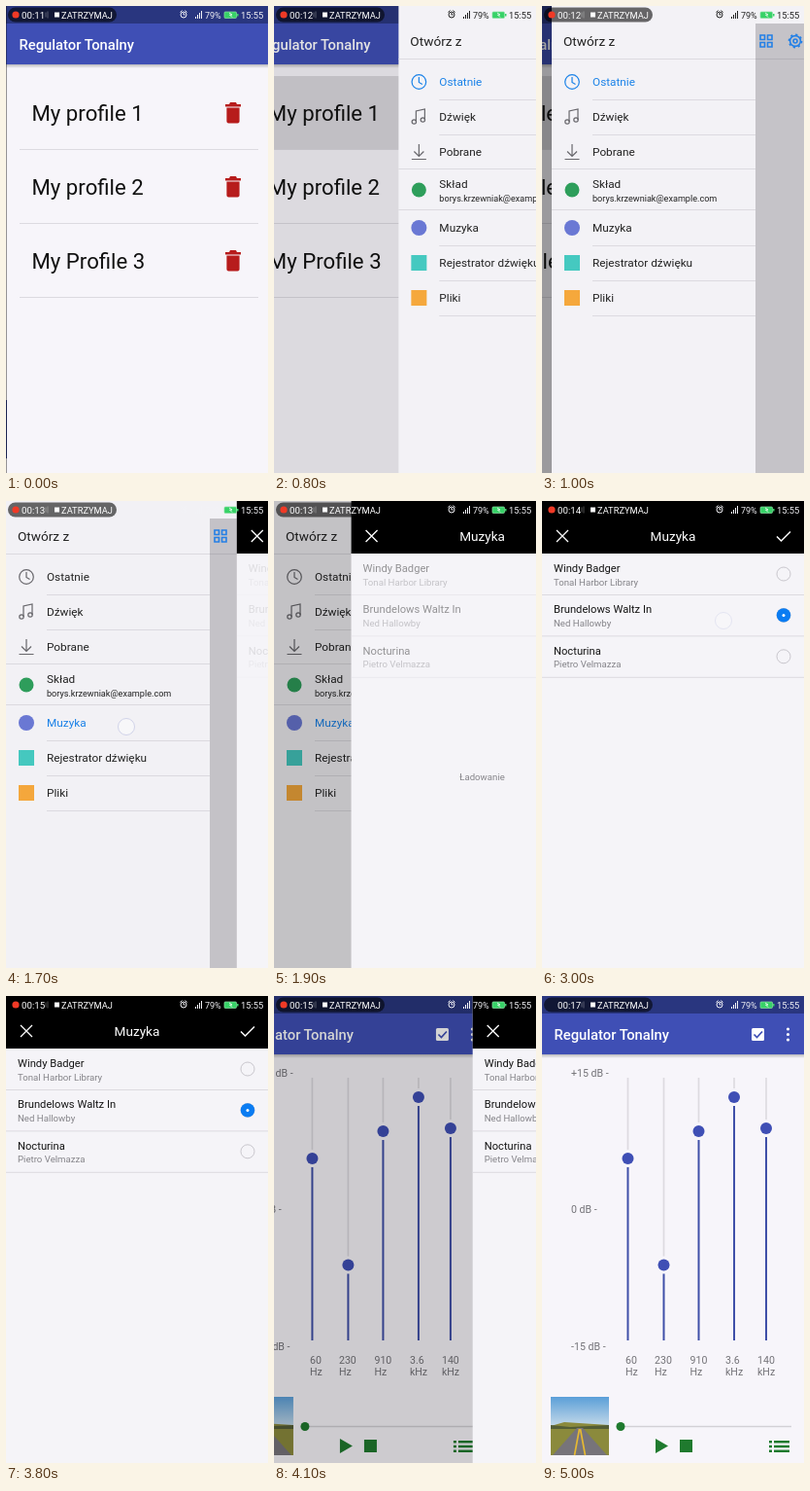
An HTML page for the animation above (5.1 s loop, 270x480 px).

```html
<!DOCTYPE html>
<html lang="pl">
<head>
<meta charset="utf-8">
<title>Regulator</title>
<style>
html, body { margin: 0; width: 100%; height: 100%; overflow: hidden; background: #f7f5fa; }
svg { display: block; width: 270px; height: 480px; font-family: Roboto, "Noto Sans", sans-serif; }
.bar { font-size: 14.8px; font-weight: 500; fill: #fff; }
.head { font-size: 13.6px; }
.name { font-size: 22.2px; fill: #111; }
.item { font-size: 11.8px; fill: #222; }
.mail { font-size: 9.1px; fill: #222; }
.song { font-size: 11.2px; fill: #151515; }
.by { font-size: 9.65px; fill: #858489; }
.scale { font-size: 10.6px; fill: #747378; }
.line { stroke: #dcdae0; }
.icon { fill: none; stroke: #68676c; stroke-width: 1.2; }
.blue { fill: none; stroke: #2480e6; stroke-width: 1.6; }
.item.on { fill: #1a82e8; }
.icon.on { stroke: #1a82e8; }
.dim { fill: #000; }
</style>
</head>
<body>
<svg viewBox="0 0 270 480">
  <defs>
    <linearGradient id="sky" x2="0" y2="1">
      <stop offset="0" stop-color="#5b9fd8"/>
      <stop offset=".6" stop-color="#d8e4ec"/>
      <stop offset="1" stop-color="#f3d9a0"/>
    </linearGradient>
    <linearGradient id="shade" x2="0" y2="1">
      <stop offset="0" stop-color="#000" stop-opacity=".25"/>
      <stop offset="1" stop-color="#000" stop-opacity="0"/>
    </linearGradient>
    <clipPath id="row"><rect x="0" y="72" width="270" height="75"/></clipPath>
    <g id="cross"><path d="M15 30l12 12M27 30l-12 12" stroke="#fff" stroke-width="1.3"/></g>
    <g id="top">
      <rect width="310" height="480" fill="#f7f5fa"/>
      <rect width="310" height="18" fill="#29367f"/>
      <rect y="18" width="310" height="42" fill="#3f4fb5"/>
      <rect y="60" width="310" height="4" fill="url(#shade)"/>
      <text class="bar" x="12.5" y="45">Regulator Tonalny</text>
    </g>
    <g id="bin" fill="#b71c1c">
      <path d="M-8-9h4l1-2h6l1 2h4v2.4h-16zM-6.6-5.4H6.6V8.5q0 2-2 2h-9.2q-2 0-2-2z"/>
    </g>
  </defs>

  <g id="eq">
    <use href="#top"/>
    <rect x="216" y="33" width="13" height="13" rx="1.5" fill="#fff"/>
    <path d="M218.5 39.5l3 3 5.5-6" fill="none" stroke="#3f4fb5" stroke-width="1.7"/>
    <path d="M253.500 34h0M253.500 39.500h0M253.500 45h0" stroke="#fff" stroke-width="3.200" stroke-linecap="round"/>
    <g class="scale">
      <text x="30" y="83">+15 dB -</text>
      <text x="30" y="223">0 dB -</text>
      <text x="30" y="364">-15 dB -</text>
    </g>
    <g id="bands"></g>
    <g id="art">
      <rect x="9" y="412" width="60" height="60" fill="url(#sky)"/>
      <path d="M9 442l14-4 46 3v31H9z" fill="#8b8a3c"/>
      <path d="M9 441l20 2 40-2v4H9z" fill="#545d35"/>
      <path d="M36 444h6l25 28H11z" fill="#77747a"/>
      <path d="M38.500 445l-5 27M39.500 445l5 27" stroke="#e5b832" stroke-width="1.700"/>
    </g>
    <path d="M81 442.500H257" stroke="#d3d1d6" stroke-width="1.500"/>
    <g fill="#1f7a2e">
      <circle cx="81" cy="442.500" r="4.500"/>
      <path d="M117 455l13 7.500-13 7.500zM142 456h13v13h-13z"/>
      <path d="M234 457h3v2.500h-3zM239 457h16v2.500h-16zM234 461.700h3v2.500h-3zM239 461.700h16v2.500h-16zM234 466.400h3v2.500h-3zM239 466.400h16v2.500h-16z"/>
    </g>
    <rect class="dim" width="310" height="480"/>
  </g>

  <g id="list">
    <use href="#top"/>
    <circle id="ripple" cx="130" cy="112" clip-path="url(#row)" fill="#000" fill-opacity=".12"/>
    <g id="profiles"></g>
    <rect class="dim" width="310" height="480"/>
  </g>

  <g id="picker">
    <rect width="310" height="480" fill="#f3f2f6"/>
    <rect x="210" y="18" width="100" height="462" fill="#c5c3c8"/>
    <path d="M210 54.500h100" stroke="#b4b2b8"/>
    <g class="blue">
      <path d="M215 30h4.500v4.500h-4.500zM222.500 30h4.500v4.500h-4.500zM215 37.500h4.500v4.500h-4.500zM222.500 37.500h4.500v4.500h-4.500z"/>
      <circle cx="251" cy="36" r="5.400"/>
      <circle cx="251" cy="36" r="2"/>
      <circle cx="251" cy="36" r="6.600" stroke-dasharray="2.200 2.984"/>
    </g>
    <text class="head" x="12" y="41" fill="#222">Otwórz z</text>
    <path class="line" d="M0 54.500h210M42 96.500h168M42 132.500h168M0 167.500h210M0 209.500h210M42 246.500h168M42 282.500h168M42 318.500h168"/>
    <g id="clock" class="icon"><circle cx="21" cy="78" r="7.300"/><path d="M21 73v5.500l3.500 2"/></g>
    <g class="icon">
      <path d="M18 119v-11l9-2v11"/><circle cx="16" cy="119" r="2.200"/><circle cx="25" cy="117" r="2.200"/>
      <path d="M21 142v12M16 149.500l5 5 5-5M13.500 157.500h15"/>
    </g>
    <circle cx="21" cy="189" r="7.500" fill="#2e9e5b"/>
    <circle cx="21" cy="228" r="8" fill="#6a78d4"/>
    <rect x="13" y="256" width="16" height="16" fill="#45c9c0"/>
    <rect x="13" y="292" width="16" height="16" fill="#f5a83c"/>
    <g class="item">
      <text id="recent" class="item" x="42" y="82">Ostatnie</text>
      <text x="42" y="118">Dźwięk</text>
      <text x="42" y="154">Pobrane</text>
      <text x="42" y="187">Skład</text>
      <text class="mail" x="42" y="201">borys.krzewniak@example.com</text>
      <text id="tunes" class="item" x="42" y="232">Muzyka</text>
      <text x="42" y="268">Rejestrator dźwięku</text>
      <text x="42" y="304">Pliki</text>
    </g>
    <rect class="dim" width="310" height="480"/>
  </g>

  <g id="music">
    <rect width="310" height="480" fill="#f5f4f8"/>
    <rect width="310" height="54" fill="#000"/>
    <use href="#cross"/>
    <text class="head" x="135" y="41" fill="#fff" text-anchor="middle">Muzyka</text>
    <path id="tick" d="M242 36.500l4.500 4.500 9.500-9.500" fill="none" stroke="#fff" stroke-width="1.500"/>
    <g id="songs"></g>
    <text id="loading" class="by" x="135" y="287" text-anchor="middle">Ładowanie</text>
    <rect class="dim" width="310" height="480"/>
  </g>

  <path id="edge" d="M0.500 405v60" stroke="#1b2350"/>
  <circle id="touch" r="8.500" fill="#fff" fill-opacity=".6" stroke="#b9bfe0" stroke-width=".9"/>

  <rect x="2" y="1.500" width="112" height="15" rx="7.500" fill="#000" fill-opacity=".58"/>
  <circle id="rec" cx="10" cy="9" r="3.600" fill="#f03a26"/>
  <g fill="#fff" font-size="9.700">
    <text id="timer" x="16" y="12.500"></text>
    <path d="M41 6.500v5M43 5.500v7" stroke="#fff" stroke-opacity=".3"/>
    <rect x="50" y="6.500" width="5" height="5"/>
    <text x="57" y="12.500" font-size="9.300">ZATRZYMAJ</text>
  </g>
  <g id="tray" font-size="9.300">
    <g fill="none" stroke="currentColor">
      <circle cx="183" cy="9" r="3"/><path d="M183 7v2h1.500M179.500 6.500l2-2M186.500 6.500l-2-2"/>
      <path d="M195.500 13v-2M197.500 13v-4M199.500 13v-6M201.500 13v-8"/>
    </g>
    <text x="205" y="12.500" fill="currentColor" font-size="9">79%</text>
    <rect x="225" y="6" width="12.500" height="6.500" rx="1" fill="#37d267" stroke="#8fe0a5" stroke-width=".7"/>
    <rect x="238" y="8" width="1.500" height="2.500" fill="#37d267"/>
    <path d="M230 7l3 2h-2.500l2.500 2.500" fill="none" stroke="#fff" stroke-width=".8"/>
    <text x="242" y="12.500" fill="currentColor">15:55</text>
  </g>
</svg>
<script>
const $ = id => document.getElementById(id);
const LOOP = 5100, STEP = 100, W = 270, SHIFT = 115;

$('profiles').innerHTML = ['My profile 1', 'My profile 2', 'My Profile 3'].map((name, i) => `
  <g transform="translate(0 ${i * 76})">
    <text class="name" x="25.5" y="118">${name}</text>
    <use href="#bin" x="233" y="110"/>
    <path class="line" d="M13 147.5h246"/>
  </g>`).join('');

$('bands').innerHTML = [
  [88.5, 167, 86, '60', 'Hz'], [125.5, 276.5, 116, '230', 'Hz'], [161.5, 139, 152.5, '910', 'Hz'],
  [198, 104, 189, '3.6', 'kHz'], [231, 136, 222, '140', 'kHz']
].map(([x, y, tx, n, unit]) => `
  <path d="M${x} 84V${y - 9}" stroke="#dddbe0" stroke-width="1.7"/>
  <path d="M${x} ${y + 9}V354" stroke="#3f4fa8" stroke-width="2"/>
  <circle cx="${x}" cy="${y}" r="6" fill="#3f4fb5"/>
  <text class="scale" x="${tx}" y="378">${n}</text>
  <text class="scale" x="${tx}" y="390">${unit}</text>`).join('');

$('songs').innerHTML = [
  ['Windy Badger', 'Tonal Harbor Library'], ['Brundelows Waltz In', 'Ned Hallowby'], ['Nocturina', 'Pietro Velmazza']
].map(([name, by], i) => `
  <g transform="translate(0 ${i * 42.4})">
    <text class="song" x="12" y="73">${name}</text>
    <text class="by" x="12" y="86.5">${by}</text>
    <circle cx="249" cy="75" r="7" fill="none" stroke="#c9c7cd"/>
    ${i === 1 ? '<g id="pick"><circle cx="249" cy="75" r="7.2" fill="#0a7cf2"/><circle cx="249" cy="75" r="1.5" fill="#fff"/></g>' : ''}
    <path class="line" d="M0 96.5h310"/>
  </g>`).join('');

const clamp = v => Math.min(1, Math.max(0, v));
const within = (t, a, b) => t >= a && t < b;
const show = (id, on) => { $(id).style.display = on ? '' : 'none'; };

// cubic-bezier(.4, 0, .2, 1)
function ease(u) {
  let lo = 0, hi = 1, s = u;
  for (let i = 0; i < 24; i++) {
    s = (lo + hi) / 2;
    const r = 1 - s;
    if (1.2 * s * r * r + 0.6 * s * s * r + s * s * s < u) lo = s; else hi = s;
  }
  return s * s * (3 - 2 * s);
}
const slide = (t, start, dur) => ease(clamp((t - start) / dur));

function place(id, x, depth) {
  $(id).setAttribute('transform', `translate(${x.toFixed(2)} 0)`);
  $(id).querySelector('.dim').setAttribute('opacity', 0.4 * depth);
}

// start, end, x, y of each finger press
const taps = [[300, 620, 130, 112], [1400, 1800, 124, 232], [2600, 3050, 187, 123], [3500, 3800, 249, 36]];
const ticks = [700, 1600, 2400, 3300, 4300, 5000];
const blinks = [[300, 600], [1300, 1500], [2500, 2700], [3300, 3700], [4300, 4500], [4900, LOOP]];

function draw(t) {
  const first = t < 100;
  const open = slide(t, 620, 500);
  const next = slide(t, 1553, 770);
  const close = slide(t, 3808, 600);
  const under = first ? 1 : (1 - close) ** 0.6;

  show('eq', first || t >= 3808);
  show('list', t < 1120);
  show('picker', within(t, 620, 2323));
  show('music', within(t, 1553, 4408));
  place('eq', -SHIFT * under, under);
  place('list', first ? 1 : -SHIFT * open ** 2, open ** 2);
  place('picker', open < 1 ? W * (1 - open) : -SHIFT * next ** 2, next ** 2);
  place('music', W * (1 - next + close), 0);
  show('edge', first);

  $('ripple').setAttribute('r', 150 * clamp((t - 300) / 300));
  const chosen = t >= 1500;
  for (const id of ['recent', 'clock']) $(id).classList.toggle('on', !chosen);
  $('tunes').classList.toggle('on', chosen);
  $('songs').setAttribute('opacity', clamp((t - 1640) / 600));
  show('loading', t < 2400);
  show('pick', t >= 2800);
  $('tick').setAttribute('opacity', t >= 2800 ? 1 : 0.2);

  const tap = taps.find(([a, b]) => within(t, a, b));
  show('touch', tap);
  if (tap) {
    $('touch').setAttribute('transform', `translate(${tap[2]} ${tap[3]})`);
    $('touch').setAttribute('opacity', clamp((tap[1] - t) / 150));
  }

  $('timer').textContent = '00:' + (11 + ticks.filter(k => t >= k).length);
  show('rec', !blinks.some(([a, b]) => within(t, a, b)));
  $('tray').style.color = within(t, 800, 1600) ? '#222' : '#f2f2f6';
}

const begin = performance.now();
function frame() {
  const t = (performance.now() - begin) % LOOP;
  draw(Math.floor(t / STEP) * STEP);
  requestAnimationFrame(frame);
}
frame();
</script>
</body>
</html>
```
